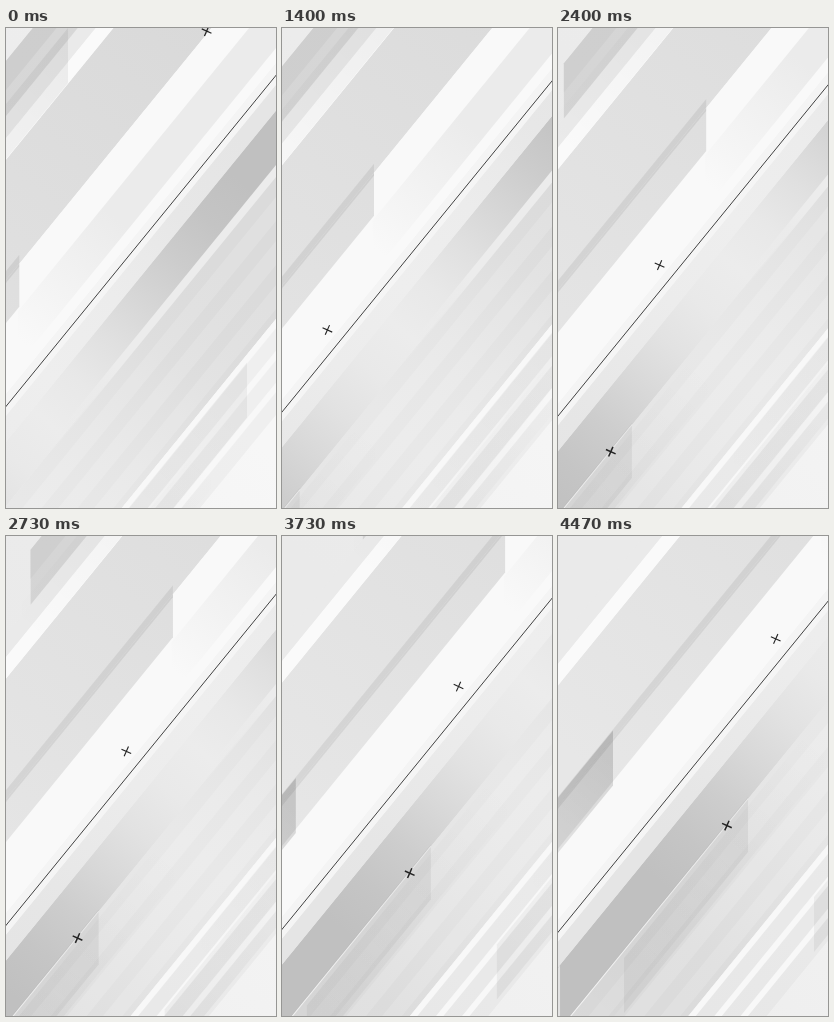
An HTML page with a canvas that plays this animation: 270 px wide and 480 px high, repeating every 4.51 s.

```html
<!DOCTYPE html>
<html lang="en">
<head>
<meta charset="utf-8">
<title>Sliding diagonal bands</title>
<style>
html, body { margin: 0; width: 100%; height: 100%; overflow: hidden; background: #f6f6f6; }
canvas { display: block; width: 100%; height: 100%; }
</style>
</head>
<body>
<canvas id="stage" width="270" height="480"></canvas>
<script>
const ctx = document.getElementById('stage').getContext('2d');
const SLOPE = 1.226;           // bands rise this much per pixel across
const SLIDE = 56.2;            // px/s along the bands
const DRIFT = 4;               // px/s downwards
const LOOP = 4510, FPS = 30;
const LEFT = -250, RIGHT = 270; // stretch of the bands that passes the stage
const PANEL = 55;              // height of the cut-off panels

const shade = (grey, alpha = 1) => `rgba(${grey},${grey},${grey},${alpha})`;
const smooth = u => u * u * (3 - 2 * u);
const awayFromGlow = x => smooth(Math.min(1, Math.abs(x - 40) / 200));

// Gradient running along the slope, written in the skewed coordinates.
function along(from, to, y, colour, steps = 1) {
  const a = 1 + SLOPE * SLOPE;
  const d = a * (to - from) / (a * a + SLOPE * SLOPE);
  const fill = ctx.createLinearGradient(from, y, from + d * a, y - d * SLOPE);
  for (let i = 0; i <= steps; i++) fill.addColorStop(i / steps, colour(i / steps));
  return fill;
}

function strip(top, bottom, fill, left = 2 * LEFT, right = 2 * RIGHT) {
  ctx.fillStyle = fill;
  ctx.fillRect(left, top, right - left, bottom - top);
}

// Tone changes evenly from left to right.
function ramp(top, bottom, start, end, left, right) {
  const tone = u => shade(start + (end - start) * u);
  strip(top, bottom, along(LEFT, RIGHT, (top + bottom) / 2, tone), left, right);
}

// Brightest at one spot, darker by depth on both sides of it.
function glow(top, bottom, bright, depth, left, right) {
  const tone = u => shade(bright - depth * awayFromGlow(LEFT + (RIGHT - LEFT) * u));
  strip(top, bottom, along(LEFT, RIGHT, (top + bottom) / 2, tone, 16), left, right);
}

// Shadow with one upright edge that fades away towards side (-1 left, 1 right).
function panel(edge, top, side, alpha) {
  const end = edge + side * 200;
  const fill = along(edge, end, top + PANEL / 2, u => shade(0, alpha * (1 - u)));
  strip(top, top + PANEL, fill, Math.min(edge, end), Math.max(edge, end));
}

function upperBands() {
  ramp(-300, 110, 234, 242);
  strip(88, 110, shade(234));
  ramp(33, 88, 211, 218, -129);
  ramp(33, 62, 208, 204, -129);
  strip(110, 132, shade(250));
  panel(62, 76, -1, 0.06);

  ramp(132, 252, 231, 214);
  strip(252, 378, shade(249));
  strip(298, 351, along(12, 110, 325, u => shade(235, u)), 12);
  strip(366, 378, shade(244));

  ramp(252, 295, 232, 214, undefined, 13.3);
  strip(243, 255, shade(0, 0.07), undefined, 13.3);
  panel(-196, 244, -1, 0.14);
}

function lowerBands() {
  strip(378, 388, shade(245));
  glow(388, 414, 238, 9);
  glow(414, 478, 236, 44);
  strip(414, 478, shade(226), undefined, -249);

  glow(478, 622, 232, 13);
  for (let y = 500; y < 600; y += 44) strip(y, y + 24, shade(255, 0.15));
  strip(468, 480, along(40, 110, 474, u => shade(236, u)), 40);
  strip(477, 478.6, shade(247), -249, -61);

  ramp(622, 900, 232, 247);
  for (let y = 622; y < 700; y += 32) {
    strip(y, y + 9, shade(248));
    strip(y + 9, y + 32, shade(0, 0.03));
  }

  panel(-61, 476, -1, 0.06);
  panel(-185, 485, 1, 0.05);
  panel(241, 630, -1, 0.05);
  panel(5, 657, 1, 0.05);
}

function line(x1, y1, x2, y2) {
  ctx.beginPath();
  ctx.moveTo(x1, y1);
  ctx.lineTo(x2, y2);
  ctx.stroke();
}

function cross(x, offset, weight) {
  ctx.save();
  ctx.translate(x, offset - SLOPE * x);
  ctx.rotate(0.42);
  ctx.lineWidth = weight;
  line(-5.3, 0, 5.3, 0);
  line(0, -5.3, 0, 5.3);
  ctx.restore();
}

function draw(seconds) {
  const shift = SLIDE * seconds, drop = DRIFT * seconds;
  ctx.setTransform(1, -SLOPE, 0, 1, shift, drop - SLOPE * shift);
  upperBands();
  lowerBands();

  ctx.strokeStyle = '#333';
  ctx.lineWidth = 0.9;
  ctx.setTransform(1, 0, 0, 1, 0, drop + 378.4);
  line(-10, 10 * SLOPE, 280, -280 * SLOPE);

  ctx.setTransform(1, 0, 0, 1, shift, drop - SLOPE * shift);
  ctx.strokeStyle = '#222';
  cross(-33.3, 352, 1.1);
  cross(-82.1, 478.8, 1.5);
  cross(200.6, 249, 1.2);
}

const start = performance.now();
function tick() {
  const elapsed = (performance.now() - start) % LOOP;
  // The 5 ms lead puts each step on its rounded 10 ms mark.
  draw(Math.floor((elapsed + 5) * FPS / 1000) / FPS);
  requestAnimationFrame(tick);
}
tick();
</script>
</body>
</html>
```
